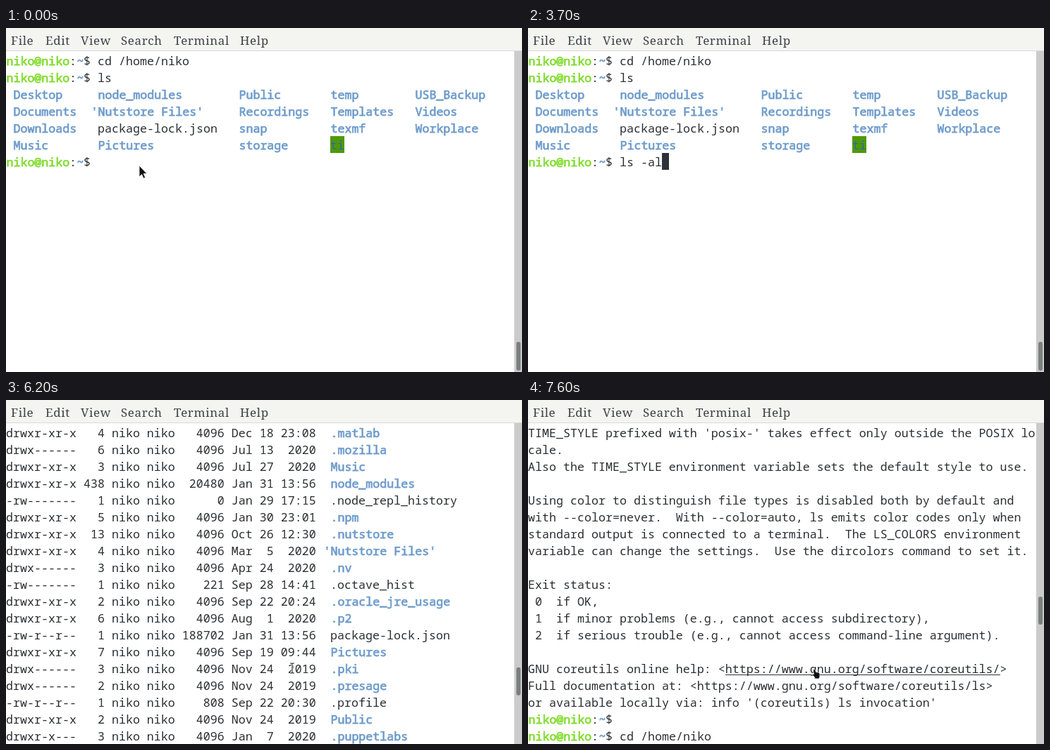
These frames come from a looping animation (732x490 px, 8 s). An HTML page:

```html
<!DOCTYPE html>
<html lang="en">
<head>
<meta charset="utf-8">
<title>Terminal session</title>
<style>
  html, body { margin: 0; width: 100%; height: 100%; overflow: hidden; background: #fff; }
  svg { display: block; width: 732px; height: 490px; }
  text { white-space: pre; }
  .menu { font: 17px "Noto Serif", serif; letter-spacing: .6px; fill: #3d4244; }
  .term { font: 16.667px "Noto Sans Mono", monospace; fill: #2b2f33; }
  /* Synthetic bold: the regular outline grown to the right and upwards. */
  .dir, .user { stroke-width: .75px; transform: translate(.4px, -.3px); }
  .dir { fill: #6f9ccb; stroke: #6f9ccb; }
  .user { fill: #83dc30; stroke: #83dc30; }
  .open { fill: #3465a4; }
</style>
</head>
<body>
<svg id="stage" viewBox="0 0 732 490" xmlns="http://www.w3.org/2000/svg">
  <defs><clipPath id="view"><rect y="34" width="721" height="456"/></clipPath></defs>
  <rect width="732" height="490" fill="#fff"/>
  <rect width="732" height="32" fill="#f4f4f1"/>
  <rect y="32" width="732" height="1" fill="#d9d9d5"/>
  <g id="menu" class="menu"></g>
  <g clip-path="url(#view)"><g id="screen" class="term"></g></g>
  <rect x="721" y="33" width="11" height="457" fill="#cbcbcb"/>
  <rect id="thumb" x="724" width="6" rx="3" fill="#7a807d"/>
  <path id="arrow" d="M0 0V16L3.6 12.6L6.1 18.3L8.7 17.1L6.2 11.6H11Z" fill="#111" stroke="#fff" stroke-width=".8"/>
  <g id="beam" fill="none">
    <path d="M-3 -7H-1L0 -6L1 -7H3M0 -6V6M-3 7H-1L0 6L1 7H3" stroke="#fff" stroke-width="3"/>
    <path d="M-3 -7H-1L0 -6L1 -7H3M0 -6V6M-3 7H-1L0 6L1 7H3" stroke="#222" stroke-width="1.1"/>
  </g>
  <path id="hand" d="M-4 -6Q-2.500 -7.500 -1.500 -5.500L-.5 -2.500L3 -2Q5 -1.500 5 .5V4L4 7H-2L-3 4L-6 1.500Q-6 -.5 -3.500 .5L-4.500 -4Z" fill="#111" stroke="#fff" stroke-width=".8"/>
</svg>
<script>
const LOOP = 8000, CELL = 10, ROW = 24, TOP = 34, BASE = 53;
const USER = 'niko';
const byId = id => document.getElementById(id);

function add(parent, tag, attrs, text) {
  const node = document.createElementNS('http://www.w3.org/2000/svg', tag);
  for (const key in attrs) node.setAttribute(key, attrs[key]);
  if (text) node.textContent = text;
  parent.append(node);
  return node;
}

const menu = { File: 7, Edit: 56, View: 106, Search: 163, Terminal: 238, Help: 332 };
for (const label in menu) add(byId('menu'), 'text', { x: menu[label], y: 24 }, label);

const screen = byId('screen');
const listing = add(screen, 'g', {});

function put(row, col, text, style = '', parent = screen) {
  if (style === 'open') {
    add(parent, 'rect', { x: col * CELL, y: TOP + row * ROW, width: text.length * CELL, height: ROW, fill: '#4e9a06' });
  }
  return add(parent, 'text', { x: col * CELL, y: BASE + row * ROW, class: style }, text);
}

function prompt(row, command = '', parent = screen) {
  put(row, 0, `${USER}@${USER}`, 'user', parent);
  put(row, 9, ':', '', parent);
  put(row, 10, '~', 'dir', parent);
  put(row, 11, '$ ' + command, '', parent);
}

// Row 0 is the "cd" line; the help text lies above it.
`TIME_STYLE prefixed with 'posix-' takes effect only outside the POSIX lo
cale.
Also the TIME_STYLE environment variable sets the default style to use.

Using color to distinguish file types is disabled both by default and
with --color=never.  With --color=auto, ls emits color codes only when
standard output is connected to a terminal.  The LS_COLORS environment
variable can change the settings.  Use the dircolors command to set it.

Exit status:
 0  if OK,
 1  if minor problems (e.g., cannot access subdirectory),
 2  if serious trouble (e.g., cannot access command-line argument).

GNU coreutils online help: <https://www.gnu.org/software/coreutils/>
Full documentation at: <https://www.gnu.org/software/coreutils/ls>
or available locally via: info '(coreutils) ls invocation'`
  .split('\n').forEach((line, i) => put(i - 18, 0, line));
const underline = add(screen, 'rect', { x: 280, y: TOP - 4 * ROW + 21, width: 390, height: 1, fill: '#2b2f33' });

prompt(-1);
prompt(0, `cd /home/${USER}`);
prompt(1, 'ls');
prompt(6);

const columns = [
  [1, 'Desktop Documents Downloads Music'],
  [13, 'node_modules Nutstore package-lock.json Pictures'],
  [33, 'Public Recordings snap storage'],
  [46, 'temp Templates texmf ti'],
  [58, 'USB_Backup Videos Workplace']
];
for (const [col, names] of columns) {
  names.split(' ').forEach((name, i) => {
    if (name === 'Nutstore') put(i + 2, col - 1, "'Nutstore Files'", 'dir');
    else put(i + 2, col, name, name === 'ti' ? 'open' : name.endsWith('.json') ? '' : 'dir');
  });
}

const modes = {
  a: 'drwxr-xr-x', b: '-rw-------', c: '-rw-r--r--', d: 'drwx------',
  g: 'drwxr-x---', r: 'drwxr--r--', w: 'drwxrwxrwx'
};
const entries = `a 68 4096 Jan 31 22:55 .
a 4 4096 Nov 24 2019 ..
a 3 4096 Aug 24 2020 .android
b 1 28416 Jan 31 22:50 .bash_history
c 1 220 Nov 24 2019 .bash_logout
c 1 4126 Jan 28 10:58 .bashrc
a 41 4096 Jan 30 20:14 .cache
a 3 4096 Mar 5 2020 .cmake
a 2 4096 Jul 13 2020 .conda
a 62 4096 Jan 31 13:56 .config
a 4 4096 Aug 24 11:32 .cpan
d 3 4096 Nov 24 2019 .dbus
a 2 4096 Jan 31 20:18 Desktop
a 2 4096 Apr 18 2020 .designer
c 1 26 Nov 24 2019 .dmrc
d 2 4096 Jul 10 2020 .docker
a 18 4096 Jan 29 18:09 Documents
a 10 4096 Jan 29 17:26 Downloads
a 7 4096 Aug 1 2020 .eclipse
a 2 4096 Mar 4 2020 .fop
a 2 4096 Jul 13 2020 .freedownloadmanager
c 1 142 Jan 30 17:20 .gitconfig
d 5 4096 Aug 24 11:41 .gnupg
b 1 20 Aug 26 23:33 .gnuplot_history
r 2 4096 Aug 24 18:12 .hardinfo
d 4 4096 Apr 18 2020 .hashcat
b 1 104442 Jan 31 11:45 .ICEauthority
a 4 4096 Nov 30 2019 .IntelliJIdea2019.3
a 4 4096 Nov 30 2019 .java
b 1 49 Jul 17 2020 .lesshst
d 5 4096 Jul 10 2020 .local
a 13 4096 Aug 27 10:55 .lyx
a 3 4096 Jan 9 2020 .m2
d 3 4096 Feb 22 2020 .macromedia
a 4 4096 Dec 18 23:08 .matlab
d 6 4096 Jul 13 2020 .mozilla
a 3 4096 Jul 27 2020 Music
a 438 20480 Jan 31 13:56 node_modules
b 1 0 Jan 29 17:15 .node_repl_history
a 5 4096 Jan 30 23:01 .npm
a 13 4096 Oct 26 12:30 .nutstore
a 4 4096 Mar 5 2020 'Nutstore Files'
d 3 4096 Apr 24 2020 .nv
b 1 221 Sep 28 14:41 .octave_hist
a 2 4096 Sep 22 20:24 .oracle_jre_usage
a 6 4096 Aug 1 2020 .p2
c 1 188702 Jan 31 13:56 package-lock.json
a 7 4096 Sep 19 09:44 Pictures
d 3 4096 Nov 24 2019 .pki
d 2 4096 Nov 24 2019 .presage
c 1 808 Sep 22 20:30 .profile
a 2 4096 Nov 24 2019 Public
g 3 4096 Jan 7 2020 .puppetlabs
a 3 4096 Aug 24 20:11 .pylint.d
b 1 1204 Jan 28 16:40 .python_history
a 2 4096 Jan 30 21:36 Recordings
a 3 4096 Jul 13 2020 .recoll
a 4 4096 Sep 22 20:31 .sage
a 8 4096 Jan 29 22:02 snap
d 2 4096 Aug 24 11:40 .ssh
a 5 4096 Jan 28 12:15 storage
a 3 4096 Mar 5 2020 .subversion
c 1 0 Nov 24 2019 .sudo_as_admin
a 2 4096 Mar 5 2020 .swp
a 3 4096 Mar 5 2020 .swt
a 3 4096 Jan 6 22:48 temp
a 3 4096 Aug 26 22:47 Templates
a 3 4096 Aug 27 10:54 .texlive2018
a 3 4096 Dec 22 2019 .texlive2019
a 3 4096 Jan 28 13:52 .texlive2020
a 4 4096 Jan 28 10:57 texmf
a 4 4096 Sep 22 20:38 .ti
w 4 4096 Sep 22 20:26 ti
a 3 4096 Nov 30 2019 .tooling
a 3 4096 Nov 30 2019 USB_Backup
a 3 4096 Nov 30 2019 .var
a 6 4096 Aug 24 20:39 Videos
a 11 4096 Aug 10 00:52 .vim
b 1 54595 Jan 31 22:53 .viminfo
c 1 2793 Jan 27 14:25 .vimrc
a 3 4096 Apr 25 2020 .vscode
d 2 4096 Aug 26 16:11 .w3m
c 1 174 Jan 14 21:36 .wakatime.cfg
c 1 100 Jan 31 22:55 .wakatime.data
c 1 188416 Jan 31 22:55 .wakatime.db
c 1 736482 Jan 31 22:55 .wakatime.log
c 1 385 Jan 28 11:04 .wget-hsts
a 17 4096 Jan 29 22:14 Workplace
b 1 0 Jul 17 2020 .Xauthority
b 1 519 Nov 30 2019 .xdvirc
b 1 10514 Jul 17 2020 .xsession-errors
d 3 4096 Mar 3 2020 .zotero`.split('\n');

put(7, 0, 'total 1532', '', listing);
entries.forEach((entry, i) => {
  const [mode, links, size, month, day, time, ...words] = entry.split(' ');
  const name = words.join(' '), perms = modes[mode], row = i + 8;
  put(row, 0, `${perms} ${links.padStart(3)} ${USER} ${USER} ${size.padStart(6)} ${month} ${day.padStart(2)} ${time.padStart(5)}`, '', listing);
  put(row, name[0] === "'" ? 45 : 46, name, mode === 'w' ? 'open' : perms[0] === 'd' ? 'dir' : '', listing);
});
const lastRow = entries.length + 8, bottom = lastRow - 18;
prompt(lastRow, '', listing);

const typed = put(6, 13, '');
const caret = add(screen, 'rect', { width: CELL, height: ROW, fill: '#2e3238' });

const ENTER = 4000, COMMAND = 'ls -al';
const keyTimes = [700, 1000, 1600, 2000, 2200, 3000];
const caretSteps = [[0, 0], [500, 1], [1500, 0], [1600, 1], [1800, 0], [2000, 1], [3200, 0], [3700, 1], [4300, 0]];
const scrollSteps = [
  [0, 0], [ENTER, bottom], [5000, 80], [5100, 76], [5500, 72], [5600, 66], [5900, 58], [6000, 48],
  [6200, 42], [6500, 38], [6600, 32], [6700, 24], [6800, 18], [6900, 14],
  [7200, 8], [7300, 0], [7500, -8], [7600, -18]
];
const pointerSteps = [
  [0, 189, 196], [4600, 189, 197], [4700, 240, 243], [4800, 330, 322], [4900, 392, 371],
  [5000, 404, 381], [5900, 406, 382], [6500, 407, 383], [7500, 408, 386], [7600, 409, 390]
];
const stepAt = (steps, t) => steps.filter(step => step[0] <= t).pop();
const show = (node, on) => node.setAttribute('visibility', on ? 'visible' : 'hidden');

function place(node, on, x, y) {
  node.setAttribute('transform', `translate(${x} ${y})`);
  show(node, on);
}

function draw(t) {
  const entered = t >= ENTER, linked = t >= 7600;
  const top = stepAt(scrollSteps, t)[1];
  const count = keyTimes.filter(time => time <= t).length;
  screen.setAttribute('transform', `translate(0 ${-top * ROW})`);
  typed.textContent = COMMAND.slice(0, count);
  show(listing, entered);
  show(underline, linked);

  caret.setAttribute('x', (13 + (entered ? 0 : count)) * CELL);
  caret.setAttribute('y', TOP + (entered ? lastRow : 6) * ROW);
  show(caret, stepAt(caretSteps, t)[1]);

  const thumb = byId('thumb');
  thumb.setAttribute('y', entered ? 448 - (bottom - top) * 1.68 : 447);
  thumb.setAttribute('height', entered ? 40 : 41);

  const [, x, y] = stepAt(pointerSteps, t);
  place(byId('arrow'), t < 500, x, y);
  place(byId('beam'), t >= 4600 && !linked, x, y);
  place(byId('hand'), linked, x, y);
}

const start = performance.now();
function tick() {
  draw((performance.now() - start) % LOOP);
  requestAnimationFrame(tick);
}
tick();
</script>
</body>
</html>
```
